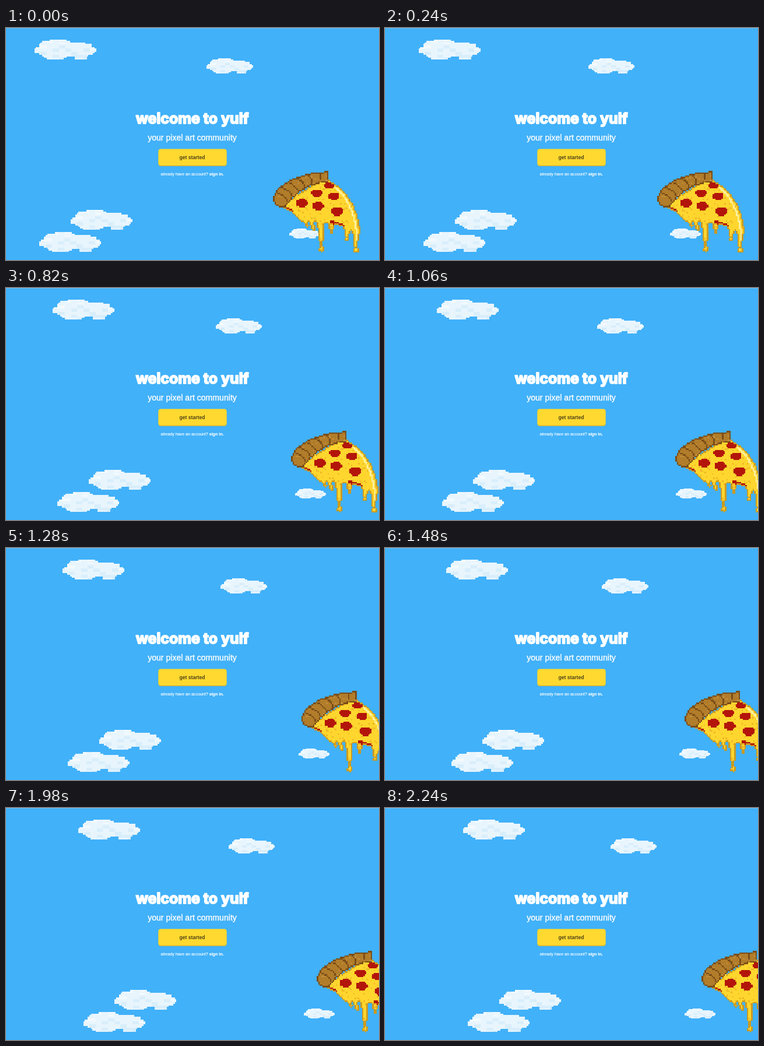
Recreate the animation shown at these times as an HTML page with a canvas. Size 640 by 398 pixels, loop 2.26 s.

```html
<!DOCTYPE html>
<html lang="en">
<head>
<meta charset="utf-8">
<title>pixel art community</title>
<style>
  html, body { margin: 0; width: 100%; height: 100%; overflow: hidden; background: #41b1f9; }
  canvas, svg { position: absolute; left: 0; top: 0; }
  text { font-family: "Liberation Sans", Arial, sans-serif; fill: #fff; stroke: #fff; text-anchor: middle; }
  .title { font: 700 25px Inter, sans-serif; stroke-width: 2; stroke-linejoin: round; }
  .lead { font-size: 14.1px; stroke-width: .35; }
  .label { font-size: 8.6px; font-weight: bold; fill: #4d4218; stroke: none; }
  .note { font-size: 7.1px; stroke-width: .15; }
</style>
</head>
<body>
<canvas id="stage" width="640" height="398"></canvas>
<svg width="640" height="398">
  <rect width="640" height="1" fill="#6dbdec"/>
  <text class="title" x="319.5" y="163.5">welcome to yulf</text>
  <text class="lead" x="319.5" y="193">your pixel art community</text>
  <rect x="261.5" y="208" width="117" height="29" rx="4" fill="#d8b636"/>
  <rect x="261.5" y="207.5" width="117" height="28" rx="4" fill="#ffd92f"/>
  <text class="label" x="319.5" y="224.5">get started</text>
  <text class="note" x="319.5" y="253">already have an account? <tspan font-weight="bold">sign in.</tspan></text>
</svg>
<script>
const ctx = document.getElementById('stage').getContext('2d');
ctx.imageSmoothingEnabled = false;

// Builds a small canvas whose cells are coloured by colorAt(x, y).
function sprite(width, height, colorAt) {
  const canvas = document.createElement('canvas');
  canvas.width = width;
  canvas.height = height;
  const pen = canvas.getContext('2d');
  for (let y = 0; y < height; y++) {
    for (let x = 0; x < width; x++) {
      const color = colorAt(x, y);
      if (!color) continue;
      pen.fillStyle = color;
      pen.fillRect(x, y, 1, 1);
    }
  }
  return canvas;
}

function noise(x, y) {
  const n = Math.sin(x * 12.9898 + y * 78.233) * 43758.5453;
  return n - Math.floor(n);
}

// Three overlapping ellipses and a tail, with each row's ends shifted at random
const cloud = sprite(40, 13, (col, row) => {
  const x = col + .5 + 3 * (noise(row, col < 20 ? 1 : 2) - .5), y = row + .5;
  const inside = (cx, cy, rx, ry) => ((x - cx) / rx) ** 2 + ((y - cy) / ry) ** 2 < 1;
  if (!inside(14, 6.5, 12.5, 6.6) && !inside(20, 7.3, 20.5, 3.8) &&
      !inside(28, 6.8, 12, 4.6) && !inside(31, 12, 4.5, 1)) return;
  const shade = noise(col >> 2, row >> 1) + row / 20;
  return shade > 1.1 ? '#d9eefb' : shade > .4 ? '#e8f5fd' : '#f3fafe';
});

const cheese = '#ffd62e', gold = '#c99a22', crust = '#b17d2a', crustDark = '#7b4d17', red = '#b3150a';
const fill = (color, d) => ({ color, path: new Path2D(d) });
const line = (color, width, d) => ({ color, width, path: new Path2D(d) });
function oval(color, x, y, rx, ry) {
  const path = new Path2D();
  path.ellipse(x, y, rx, ry, 0, 0, 7);
  return { color, path };
}

// A tapered strand hanging from the lower cheese edge, ending in a drop
function drip(x, tip) {
  const top = 60 + x / 4, topX = x - Math.max(0, (90 - x) / 4), radius = (tip - 60) / 15;
  return [
    fill(cheese, `M${topX - 7} ${top}H${topX + 7}L${x + 2.5} ${tip}H${x - 2.5}Z`),
    oval(cheese, x, tip, radius, radius)
  ];
}

// Outer and inner edge of the crust as Bezier curves, from left to right
const outer = [[0, 46], [4, 26], [40, 2], [94, 1]];
const inner = [[18, 64], [34, 40], [66, 20], [94, 18]];
const pointOn = (curve, t) => [0, 1].map(axis => {
  const [a, b, c, d] = curve.map(point => point[axis]), s = 1 - t;
  return a * s ** 3 + 3 * b * s * s * t + 3 * c * s * t * t + d * t ** 3;
});
function crustFold(t) {
  const [x1, y1] = pointOn(outer, t), [x2, y2] = pointOn(inner, t * .9);
  return line(crustDark, 2.2, `M${x1} ${y1}Q${(x1 + x2) / 2 + 7} ${(y1 + y2) / 2 - 4} ${x2} ${y2}`);
}

const innerBack = [...inner].reverse();
const base = [
  fill(cheese, 'M93 14Q146 42 150 108L142 110Q125 94 100 92Q60 88 17 63Q40 35 93 14Z'),
  ...[[50, 86], [59, 95], [69, 100], [83, 134], [100, 105], [127, 117], [142, 136]].flatMap(p => drip(...p)),
  fill(crust, `M${outer[0]}C${outer.slice(1)}L${innerBack[0]}C${innerBack.slice(1)}L6 60Q0 55 0 46Z`)
];
const details = [
  line(crustDark, 2.4, `M${inner[0]}C${inner.slice(1)}`),
  ...[.15, .3, .45, .6, .75, .9].map(crustFold),
  line('#fff09a', 3, 'M106 27Q136 52 143 102V130'),
  line(red, 6, 'M22 64L34 70M98 87L122 95'),
  ...[[96, 25], [75, 38], [104, 43], [49, 55], [77, 60], [110, 69]]
    .map(([x, y]) => oval(red, x, y, 7.5 + y / 22, 5 + y / 25))
];

function topColor(shapes, x, y) {
  const hit = shapes.findLast(({ path, width }) => {
    if (!width) return ctx.isPointInPath(path, x, y);
    ctx.lineWidth = width;
    return ctx.isPointInStroke(path, x, y);
  });
  return hit && hit.color;
}

const cell = 2.5;
const pizza = sprite(61, 58, (col, row) => {
  const x = (col + .5) * cell, y = (row + .5) * cell;
  const color = topColor(base, x, y);
  if (!color) return;
  const isEdge = [[1, 0], [-1, 0], [0, 1], [0, -1]]
    .some(([dx, dy]) => !topColor(base, x + dx * cell, y + dy * cell));
  if (isEdge) return color === crust ? crustDark : gold;
  const speck = color === crust ? '#c08d3b' : '#efb724';
  return topColor(details, x, y) || (noise(col, row) > .93 ? speck : color);
});

// Left edge at the start, top and depth: deeper clouds are smaller and slower.
const clouds = [[48.6, 19.5, 1], [344, 52, 2], [111, 312, 1], [57.3, 350, 1], [486, 344, 3]];
const speed = .038;

function draw(now) {
  const t = Math.floor(now % 2260 / 20) * 20;
  ctx.fillStyle = '#41b1f9';
  ctx.fillRect(0, 0, 640, 398);
  for (const [x, y, depth] of clouds) {
    const width = 26.5 * (5 - depth);
    ctx.drawImage(cloud, x + speed / depth * t, y, width, width * .325);
  }
  ctx.drawImage(pizza, 458 + speed * t, 245, pizza.width * cell, pizza.height * cell);
  requestAnimationFrame(draw);
}
requestAnimationFrame(draw);
</script>
</body>
</html>
```
